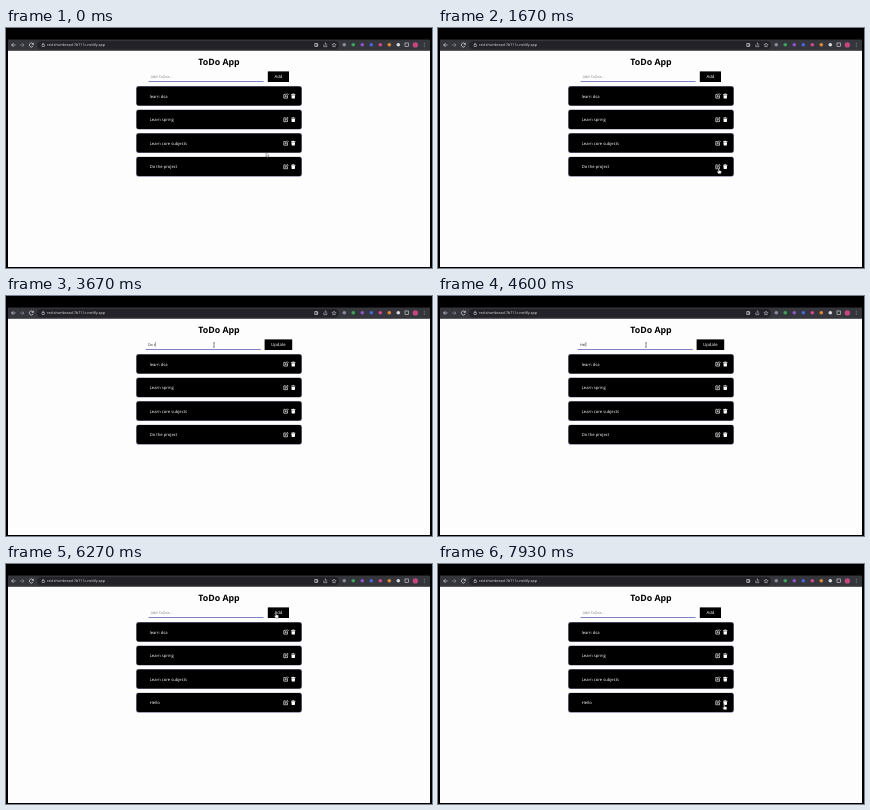
These frames come from a looping animation (426 by 240 pixels, 8000 ms). An HTML page:

```html
<!DOCTYPE html>
<html lang="en">
<head>
<meta charset="utf-8">
<title>ToDo App</title>
<style>
  html, body { margin: 0; width: 100%; height: 100%; overflow: hidden; background: #000; }
  svg { display: block; width: 100vw; height: 100vh; }
  text { font-family: "Open Sans", "Noto Sans", sans-serif; text-rendering: geometricPrecision; white-space: pre; }
</style>
</head>
<body>
<svg id="stage" viewBox="0 0 426 240">
  <rect width="426" height="240"/>
  <rect x="2" y="22" width="422" height="217" fill="#fdfdfd"/>
  <g id="toolbar">
    <rect x="2" y="11.5" width="422" height="11.3" fill="#35353c"/>
    <rect x="31" y="13" width="302" height="8.4" rx="4.2" fill="#222228"/>
    <g fill="none" stroke="#d6d6dc" stroke-width=".7">
      <path d="M9.5 17H5.6M7.4 15.2L5.6 17l1.8 1.8"/>
      <path d="M14 17h3.9M16.1 15.2l1.8 1.8-1.8 1.8" opacity=".5"/>
      <path d="M27.2 16.2a2 2 0 1 0 0 1.6M27.4 14.8v1.6h-1.6"/>
      <path d="M36 16.6h2.4v1.9H36zM36.5 16.6v-.7a.7.7 0 0 1 1.4 0v.7" stroke-width=".5"/>
      <path d="M308.8 15.5h2.6v3h-2.6zM310 17h2.3"/>
      <path d="M317.8 16.5v2.2h3v-2.2M319.3 17.6v-2.8l1.3 1" opacity=".7"/>
      <path d="M328 15l.6 1.3 1.4.2-1 1 .2 1.4-1.2-.7-1.2.7.2-1.4-1-1 1.4-.2z" stroke-width=".5"/>
    </g>
    <text x="41" y="18.4" font-size="3.65" fill="#e4e4e8">red-shortbread-7b711c.netlify.app</text>
  </g>
  <text x="213" y="37" font-size="8.8" font-weight="700" text-anchor="middle">ToDo App</text>
  <g id="form">
    <rect id="line" y="53" width="115" height=".8" fill="#6264bd"/>
    <text id="field" y="49.7"/>
    <rect id="caret" y="46" width=".4" height="4.6" fill="#222"/>
    <rect id="button" y="43.4" height="10.6"/>
    <text id="label" x="272.4" y="50.2" font-size="4.25" fill="#fff" text-anchor="middle"></text>
  </g>
  <g id="cards"></g>
  <g id="pointer" stroke-linejoin="round">
    <path id="arrow" d="M0 0v4.3l1-.9.7 1.5.8-.4-.7-1.4h1.4z" fill="#fff" stroke="#222" stroke-width=".35"/>
    <path id="hand" d="M-.5 0q.5-.6 1 0v1.8l1.7.4q.6.2.5.9L2.3 5H-.4L-1.7 3q0-.6.6-.4l.6.5z" fill="#fff" stroke="#222" stroke-width=".35"/>
    <path id="beam" d="M-1-2.2h.7L0-1.9l.3-.3H1M0-1.9v3.8M-1 2.2h.7L0 1.9l.3.3H1" fill="none" stroke="#222" stroke-width=".5"/>
  </g>
</svg>
<script>
const LOOP = 8000, EDIT = 1870, UPDATE = 6130;
const OLD = "Do the project", NEW = "Hello";
const ERASE = 2900, ERASE_STEP = 75;
const KEY_TIMES = [4130, 4330, 4540, 4800, 5000];

const $ = id => document.getElementById(id);
const set = (node, attrs) => {
  for (const name in attrs) node.setAttribute(name, attrs[name]);
  return node;
};
const add = (parent, tag, attrs, content = "") => {
  const node = document.createElementNS("http://www.w3.org/2000/svg", tag);
  node.textContent = content;
  return parent.appendChild(set(node, attrs));
};
const show = (id, on) => set($(id), { visibility: on ? "visible" : "hidden" });

// Browser extensions, profile and menu
["#8b8b98", "#3fa35a", "#8d55c9", "#4968d8", "#d0488e", "#e08a38", "#d8d8de"].forEach((fill, i) =>
  add($("toolbar"), "circle", { cx: 338.3 + i * 9, cy: 16.8, r: 1.8, fill }));
add($("toolbar"), "rect", { x: 399, y: 15, width: 3.5, height: 3.6, fill: "none", stroke: "#ddd", "stroke-width": .6 });
add($("toolbar"), "circle", { cx: 409.3, cy: 16.9, r: 2.7, fill: "#c2477f" });
for (let i = 0; i < 3; i++)
  add($("toolbar"), "circle", { cx: 418.2, cy: 15.2 + i * 1.7, r: .4, fill: "#ddd" });

const labels = ["learn dsa", "Learn spring", "Learn core subjects", OLD].map((task, i) => {
  const card = add($("cards"), "g", { transform: `translate(0 ${58.2 + i * 23.55})` });
  add(card, "rect", { x: 130, y: -.2, width: 166, height: 20, rx: 2.4, fill: "#8888a4" });
  add(card, "rect", { x: 130.6, y: .2, width: 164.8, height: 19, rx: 2 });
  add(card, "path", {
    d: "M279.8 8.1h-2v3.8h3.7V9.8M279.2 10.5l.2-1 2-2 .8.8-2 2z",
    fill: "none", stroke: "#fff", "stroke-width": .65
  });
  add(card, "path", { d: "M285.1 7.9h1.2l.4-.5h1.1l.4.5h1.2v.7h-4.3zM285.4 9h3.7l-.3 3.2h-3.1z", fill: "#fff" });
  return add(card, "text", { x: 143.7, y: 11.4, "font-size": 4.15, fill: "#fff" }, task);
});

// Pointer stops: time, x, y
const stops = [
  [0, 260, 124.5], [200, 260, 124.5], [1000, 280.7, 140.7], [2000, 280.7, 140.7],
  [2600, 208, 49], [5200, 208, 49], [5600, 254.7, 42.5], [5850, 270, 49],
  [6250, 270, 49], [6850, 243, 60], [7030, 243, 60], [7750, 286.3, 140.7], [LOOP, 286.3, 140.7]
];

function pointerAt(t) {
  const i = stops.findIndex(stop => stop[0] > t);
  const [t0, x0, y0] = stops[i - 1], [t1, x1, y1] = stops[i];
  const u = (t - t0) / (t1 - t0), ease = u * u * (3 - 2 * u);
  return [x0 + (x1 - x0) * ease, y0 + (y1 - y0) * ease];
}

function fieldText(t) {
  const typed = KEY_TIMES.filter(time => t >= time).length;
  if (typed) return NEW.slice(0, typed);
  const erased = Math.max(0, Math.floor((t - ERASE) / ERASE_STEP));
  return OLD.slice(0, Math.max(0, OLD.length - erased));
}

function draw(t) {
  const editing = t >= EDIT && t < UPDATE;
  const value = editing ? fieldText(t) : "";
  const left = editing ? 139.7 : 142.5;
  set($("line"), { x: left });
  set($("button"), { x: editing ? 258.6 : 261.8, width: editing ? 27.6 : 21.2 });
  $("label").textContent = editing ? "Update" : "Add";
  set($("field"), {
    x: left + 2.2, fill: value ? "#222" : "#85858c", "font-size": value ? 3.65 : 3.75
  }).textContent = value || "Add ToDos...";
  const textWidth = value ? $("field").getComputedTextLength() : 0;
  set($("caret"), { x: left + 2.4 + textWidth });
  show("caret", editing && t > 2600 && t < 5300);
  labels[3].textContent = t < UPDATE ? OLD : NEW;

  const [x, y] = pointerAt(t);
  const onIcon = y > 135 && x > 276;
  const onButton = x > 259 && x < 286 && y > 43 && y < 54;
  const onField = x > left && x < left + 114 && y > 45 && y < 53;
  set($("pointer"), { transform: `translate(${x} ${y})` });
  show("hand", onIcon || onButton);
  show("beam", onField);
  show("arrow", !onIcon && !onButton && !onField);
}

function tick() {
  draw(performance.now() % LOOP);
  requestAnimationFrame(tick);
}
tick();
</script>
</body>
</html>
```
